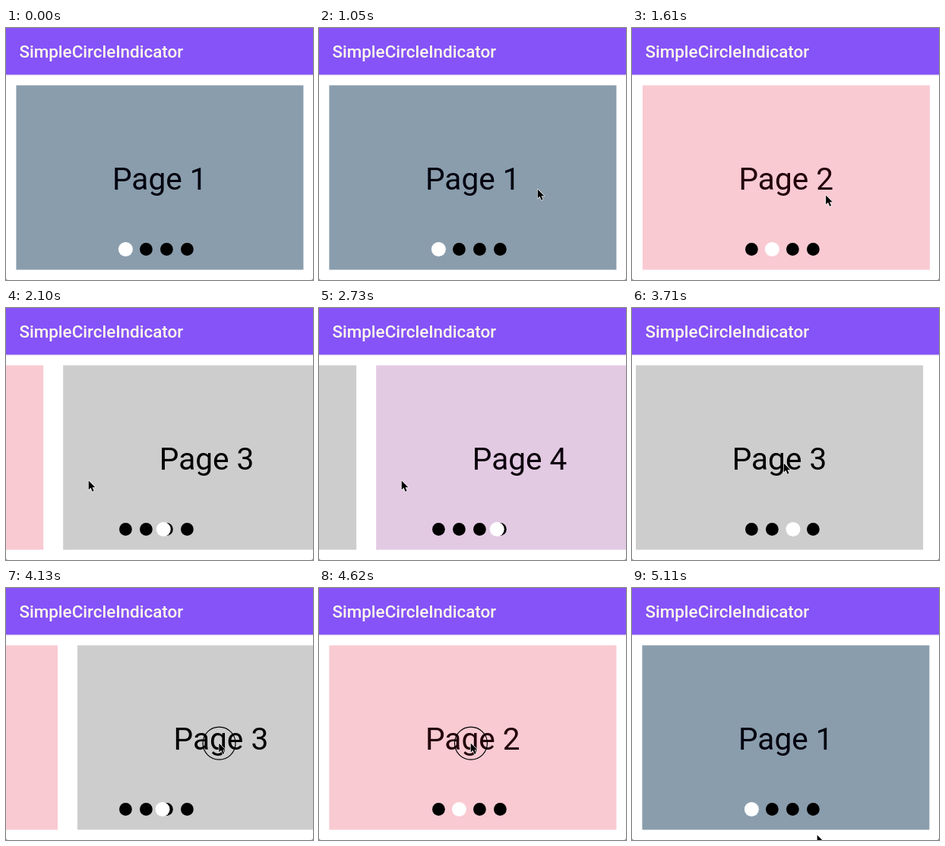
An HTML page for the animation above (5180 ms loop, 404x332 px).

```html
<!DOCTYPE html>
<html lang="en">
<head>
<meta charset="utf-8">
<title>Circle indicator</title>
<style>
  html, body { margin: 0; width: 100%; height: 100%; overflow: hidden; background: #8c8c8c; }
  svg { display: block; width: 404px; height: 332px; font-family: Roboto, sans-serif; }
  .title { font-size: 22.45px; font-weight: 500; fill: #fff8ec; }
  .label { font-size: 40.6px; text-anchor: middle; }
</style>
</head>
<body>
<svg viewBox="0 0 404 332">
  <rect width="404" height="332" rx="3" fill="#fff"/>
  <rect width="404" height="63" fill="#f1ecf6"/>
  <rect width="404" height="61.5" fill="#8553f8"/>
  <text class="title" x="17.4" y="39.4">SimpleCircleIndicator</text>
  <g id="pages"></g>
  <g id="dots"></g>
  <circle id="active" cy="291.5" r="9.5" fill="#fff"/>
  <g id="pointer">
    <circle id="ring" cx=".9" cy="1.6" r="21.5" fill="none" stroke="#000" stroke-width="1.2"/>
    <path transform="translate(.7 1.5) scale(.8)" d="M0 0V15l3.5-3.3 2.7 6.2 2.5-1.1-2.6-6h4.7z"
          stroke="#fff" stroke-width="1.6" stroke-linejoin="round" paint-order="stroke"/>
  </g>
</svg>
<script>
const LOOP = 5180, STEP = 70, PITCH = 404, DOT_X = 157.4, DOT_GAP = 27;
const PERIOD = 630, PRESS = 40, DRAG = 195, HOLD = 80, RETURN = 70, SETTLE = 302;
const byId = id => document.getElementById(id);
const clamp = v => Math.min(1, Math.max(0, v));
const smooth = v => { const u = clamp(v); return u * u * (3 - 2 * u); };

const pages = [
  { fill: '#8a9dad', ink: '#00000f' },
  { fill: '#f9cad2', ink: '#22000a' },
  { fill: '#cdcdcd', ink: '#000' },
  { fill: '#e3cae3', ink: '#0c000c' },
];

byId('pages').innerHTML = pages.map(({ fill, ink }, i) => `
  <g transform="translate(${i * PITCH})">
    <rect x="13.4" y="75.5" width="378" height="243" fill="${fill}"/>
    <text class="label" x="202.3" y="212.5" fill="${ink}">Page ${i + 1}</text>
  </g>`).join('');
byId('dots').innerHTML = pages.map((_, i) =>
  `<circle cx="${DOT_X + i * DOT_GAP}" cy="291.5" r="8.4"/>`).join('');

// Three swipes forward, then three back
const forward = { time: 1200, page: 0, dir: 1, x: 254.5, y: 219, dx: -146.5, dy: 7 };
const back = { time: 3360, page: 3, dir: -1, x: 199, y: 203, dx: 100, dy: 0 };
const swipes = [forward, back].flatMap(run => [0, 1, 2].map(i => ({
  ...run, start: run.time + i * PERIOD, from: run.page + i * run.dir,
})));

// Where the pointer rests between drags
const rests = [
  { t: 0, x: 243, y: 345 }, { t: 440, x: 243, y: 345 }, { t: 1050, x: 287, y: 211 },
  { ...forward, t: 1200 }, { ...forward, t: 2810 },
  { ...back, t: 3340 }, { ...back, t: 5040 },
  { t: 5110, x: 243, y: 324 }, { t: LOOP, x: 243, y: 345 },
];

const currentSwipe = t => swipes.findLast(s => s.start - PRESS <= t);

// Out with the drag, a short hold, then home again
const reachAt = age => smooth(age / DRAG) - smooth((age - DRAG - HOLD) / RETURN);

function pointerAt(t, swipe) {
  const i = Math.max(1, rests.findIndex(rest => rest.t >= t));
  const a = rests[i - 1], b = rests[i];
  const k = 1 - (1 - (t - a.t) / (b.t - a.t)) ** 3;
  const reach = swipe ? reachAt(t - swipe.start) : 0;
  const { dx, dy } = swipe || forward;
  return [a.x + (b.x - a.x) * k + dx * reach, a.y + (b.y - a.y) * k + dy * reach];
}

function scrollAt(t, swipe) {
  if (!swipe) return 0;
  const age = t - swipe.start;
  const dragged = swipe.from * PITCH - swipe.dx * smooth(age / DRAG);
  const target = (swipe.from + swipe.dir) * PITCH;
  const left = 1 - clamp((age - DRAG) / SETTLE);
  return target + (dragged - target) * left ** 5;
}

function draw() {
  const t = Math.floor(performance.now() % LOOP / STEP) * STEP;
  const swipe = currentSwipe(t);
  const scroll = scrollAt(t, swipe), [x, y] = pointerAt(t, swipe);
  const pressed = swipe && t < swipe.start + DRAG;
  byId('pages').setAttribute('transform', `translate(${-scroll})`);
  byId('active').setAttribute('cx', DOT_X + scroll / PITCH * DOT_GAP);
  byId('pointer').setAttribute('transform', `translate(${x} ${y})`);
  byId('ring').setAttribute('visibility', pressed ? 'visible' : 'hidden');
  requestAnimationFrame(draw);
}
draw();
</script>
</body>
</html>
```
